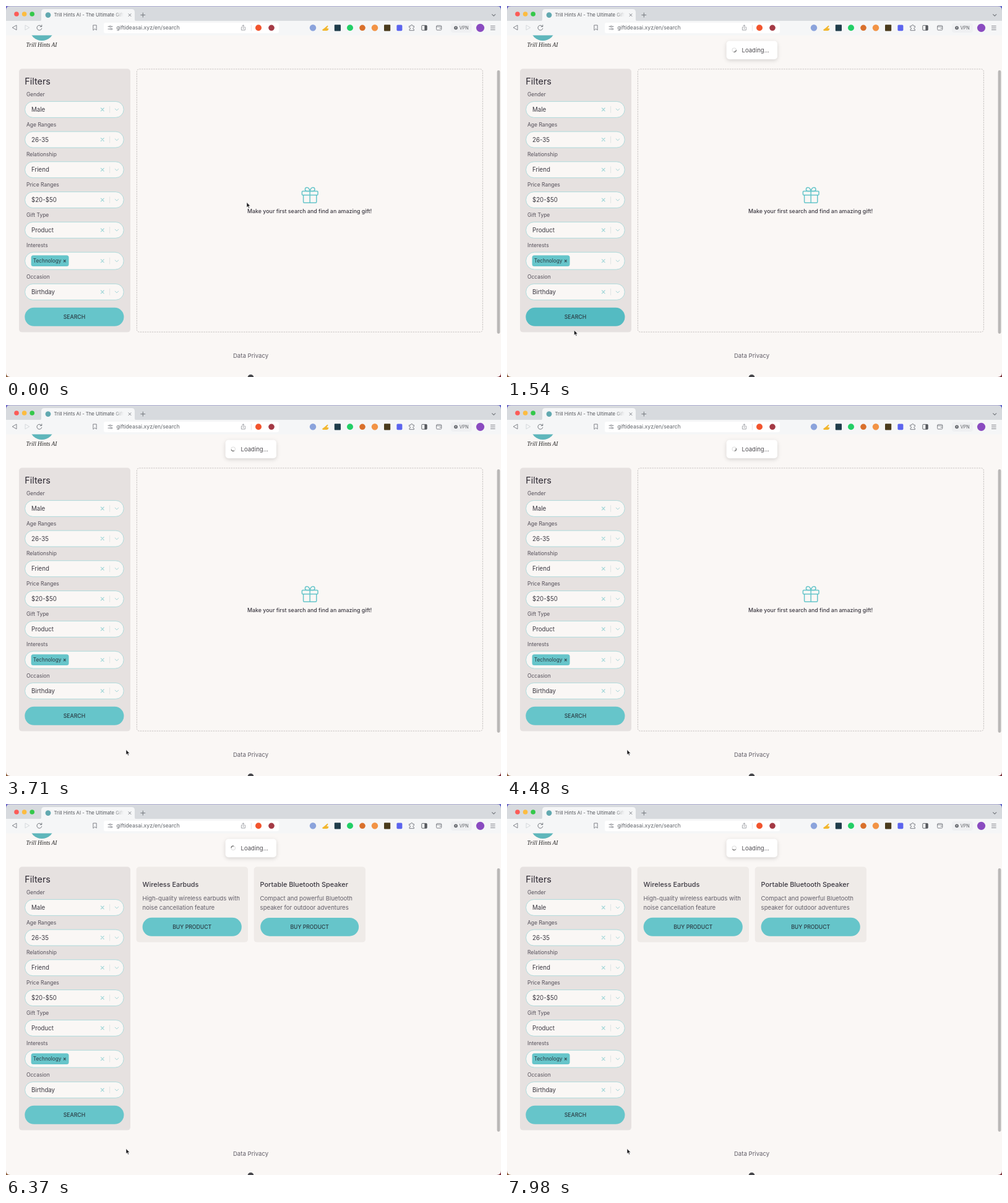
Write an HTML page that moves like this. It is 800x600 px and loops after 8000 ms.

```html
<!DOCTYPE html>
<html lang="en">
<head>
<meta charset="utf-8">
<title>Gift search</title>
<style>
  html, body { margin: 0; width: 100%; height: 100%; overflow: hidden; background: #faf7f5; }
  svg { display: block; width: 800px; height: 600px; font-family: Inter, sans-serif; }
  text { white-space: pre; }
</style>
</head>
<body>
<svg id="stage" viewBox="0 0 800 600" xmlns="http://www.w3.org/2000/svg"></svg>
<script>
const LOOP = 8000;
const TOAST_AT = 1120, CARD_1 = 4550, CARD_2 = 6360;
const TEAL = '#66c5ca', INK = '#3b3841', SOFT = '#625e68', PAGE = '#faf7f5';

const rect = (x, y, w, h, r, fill, more = '') =>
  `<rect x="${x}" y="${y}" width="${w}" height="${h}" rx="${r}" fill="${fill}" ${more}/>`;
const dot = (x, y, r, fill, more = '') =>
  `<circle cx="${x}" cy="${y}" r="${r}" fill="${fill}" ${more}/>`;
const line = (d, color, width = 1, more = '') =>
  `<path d="${d}" fill="none" stroke="${color}" stroke-width="${width}" stroke-linecap="round" stroke-linejoin="round" ${more}/>`;
const text = (x, y, size, str, fill = INK, more = '') =>
  `<text x="${x}" y="${y}" font-size="${size}" fill="${fill}" ${more}>${str}</text>`;
const cross = (x, y, r, color, width) =>
  line(`M${x - r} ${y - r}l${2 * r} ${2 * r}m0 ${-2 * r}l${-2 * r} ${2 * r}`, color, width);
const MID = 'text-anchor="middle"', BOLD = 'font-weight="500"';

function button(x, y, w, label, id) {
  return `<g id="${id}">${rect(x, y, w, 30, 15, TEAL)}` +
    text(x + w / 2, y + 18.2, 8.7, label, '#2a3b43', `${MID} ${BOLD}`) + '</g>';
}

function field(label, value, y, h = 26) {
  const tag = label === 'Interests';
  return text(33, y - h / 2 - 8.5, 8.5, label, '#544f59') +
    rect(30.6, y - h / 2, 159.6, h, h / 2, PAGE, 'stroke="#a8d9da" stroke-width=".9"') +
    (tag
      ? rect(40.6, y - 8.9, 60.9, 17.8, 3.5, TEAL) + text(43.8, y + 3, 8.25, value, '#2a3b43') +
        cross(94.8, y + .2, 1.5, '#2a3b43', 1.1)
      : text(41, y + 3.6, 9.7, value)) +
    cross(155.8, y, 2.4, '#a0d6d8', 1.1) +
    line(`M167.6 ${y - 5}v10`, '#d9dfde', .7) +
    line(`M176.2 ${y - 1.2}l2.8 2.7l2.8-2.7`, '#a9d7d9', 1);
}

function filters() {
  return rect(21, 101.6, 180, 426, 5, '#e6e1e0') +
    text(30.3, 127, 14.4, 'Filters', '#2b2731') +
    field('Gender', 'Male', 167.4) +
    field('Age Ranges', '26-35', 216.1) +
    field('Relationship', 'Friend', 264.8) +
    field('Price Ranges', '$20-$50', 313.6) +
    field('Gift Type', 'Product', 362.4) +
    field('Interests', 'Technology', 412.2, 28) +
    field('Occasion', 'Birthday', 462.4) +
    button(30.3, 487.8, 160.2, 'SEARCH', 'search');
}

function emptyState() {
  return '<g id="empty">' +
    rect(211.4, 102, 559, 425.2, 4, 'none', 'stroke="#c0bcba" stroke-width=".9" stroke-dasharray="2.4 1.4"') +
    `<g fill="none" stroke="${TEAL}" stroke-width="1.5" stroke-linejoin="round">
      <rect x="478.4" y="299.6" width="25.6" height="6.2" rx="1.2"/>
      <path d="M480.6 305.8v11q0 1.5 1.5 1.5h18.2q1.5 0 1.5-1.5v-11M491.2 299.6v18.7"/>
      <path d="M491.2 299.6c-.8-4-2.6-6.2-4.8-6.2c-4 0-4 6.2 0 6.2zm0 0c.8-4 2.6-6.2 4.8-6.2c4 0 4 6.2 0 6.2z"/>
    </g>` +
    text(490.6, 335.2, 8.85, 'Make your first search and find an amazing gift!', INK, `${MID} ${BOLD}`) + '</g>';
}

function card(id, x, title, lines) {
  return `<g id="${id}">` + rect(x, 101.6, 180.4, 122, 5, '#efebe8') +
    text(x + 10, 134.2, 10.9, title, INK, BOLD) +
    lines.map((s, i) => text(x + 10, 155.5 + 15 * i, 9.6, s, SOFT)).join('') +
    button(x + 10, 183.8, 160.2, 'BUY PRODUCT', id + 'Buy') + '</g>';
}

function toast() {
  return '<g id="toast">' +
    rect(354.6, 56.6, 82.4, 29.6, 5, '#fff', 'style="filter:drop-shadow(0 2px 3px rgba(0,0,0,.15))"') +
    dot(367.2, 71.2, 3.2, 'none', 'stroke="#e0e0e0" stroke-width="1.2"') +
    `<g id="spin">${line('M2.26-2.26A3.2 3.2 0 0 1 2.26 2.26', '#707070', 1.2)}</g>` +
    text(379.6, 74.7, 9.5, 'Loading...', '#504e53') + '</g>';
}

function browser() {
  const gray = '#74787e';
  const bar = rect(0, 0, 800, 25, 0, '#d7dade') + rect(0, 24, 800, 23.4, 0, '#f5f6f7') +
    '<path d="M54 24.5q3 0 3-3V10q0-5 5-5h141q5 0 5 5v11.5q0 3 3 3z" fill="#f5f6f7"/>' +
    ['#fc5b57', '#fdbc40', '#34c84a'].map((c, i) => dot(17 + 12.6 * i, 13, 3.8, c)).join('') +
    dot(68, 14.6, 4.4, '#62a9b0') +
    text(77.6, 17.4, 7.7, 'Trill Hints AI - The Ultimate Gift', '#53565b', 'mask="url(#fade)"') +
    cross(200, 14.6, 2, gray, .9) +
    line('M217.8 14.6h7m-3.5-3.5v7', gray, 1) +
    line('M785.6 13.6l2.6 2.6l2.6-2.6', gray, 1.1);
  const nav = line('M17 31.4v7.4l-6.4-3.7z', gray, .9) +
    line('M31 31.4v7.4l6.4-3.7z', '#d2d5d8', .9) +
    line('M57.3 33a4 4 0 1 0 .5 3.4M57.8 30.8v2.6h-2.6', gray, 1) +
    line('M141.2 31h5v8l-2.5-2l-2.5 2z', gray, .9) +
    rect(158, 27, 283, 17, 3, '#fff') +
    line('M165 33.2h2m3 0h2.2M165 37.2h3m3 0h1.2', gray, .9) +
    dot(168.4, 33.2, 1.2, 'none', `stroke="${gray}" stroke-width=".8"`) +
    dot(169.8, 37.2, 1.2, 'none', `stroke="${gray}" stroke-width=".8"`) +
    text(178.4, 38.4, 8.6, 'giftideasai.xyz/en/search', '#5f6369') +
    line('M381.4 34.2h-1v4.8h6v-4.8h-1M383.4 37v-6m-1.6 1.4l1.6-1.6l1.6 1.6', '#8d9196', .8) +
    line('M396.4 31v9', '#dcdee0', .8) +
    dot(408, 35.3, 5, '#f2542d') + dot(429, 35.3, 4.8, '#a43a45');
  const tools = dot(496, 35.3, 5.2, '#8ba3dc') +
    '<path d="M511 38.6l4-3l4.6-4l1 1.2l-2.4 3.2l3.2.4q0 3-3.4 3.6h-6z" fill="#f2b72f"/>' +
    rect(530.8, 30.2, 10.2, 10.2, 1, '#1f3d4b') +
    dot(556, 35.3, 5, '#22cf66') +
    dot(576, 35.3, 4.8, '#d9702c') +
    dot(596, 35.3, 5.2, '#f29345') +
    rect(611, 30.2, 10.2, 10.2, 1, '#4a3b1c') +
    rect(631.4, 30.4, 9, 9.8, 1.6, '#5b64ee') +
    line('M652 32.4h2.2q0-2 1.5-2t1.5 2h2.2v2.4q-1.6 0-1.6 1.5t1.6 1.5v1.8h-7.4v-2q1.6 0 1.6-1.4t-1.6-1.4z', gray, .9) +
    rect(671.8, 31.4, 8.4, 7.8, 1, 'none', 'stroke="#55585d" stroke-width=".9"') +
    rect(676.4, 31.4, 3.8, 7.8, .5, '#55585d') +
    rect(695.6, 31.6, 8.2, 7.4, 1.4, 'none', `stroke="${gray}" stroke-width=".9"`) +
    line('M696 33.6h7.6M701 36.2h2.6', gray, .8) +
    rect(719, 28, 34, 15, 4, '#eff0f2') +
    dot(727, 35.3, 2.9, '#66696e') + dot(727, 35.3, 1, '#cfd1d4') +
    text(732.8, 38, 7.2, 'VPN', '#5c5f64') +
    dot(766.5, 35.3, 6.6, '#8a4bc0') +
    line('M783.4 32.4h6.8m-6.8 3h6.8m-6.8 3h6.8', gray, .9);
  return bar + nav + tools;
}

function corners() {
  return '<path d="M0 0h7q-7 0-7 7z" fill="#5a4fc4"/><path d="M800 0h-7q7 0 7 7z" fill="#4a50c8"/>' +
    '<path d="M0 600h7q-7 0-7-7z" fill="#8a5a38"/><path d="M800 600h-7q7 0 7-7z" fill="#7a2f38"/>' +
    rect(0, 0, 800, .6, 0, '#9694cc');
}

function pointers() {
  return `<path id="arrow" d="M0 0v8.2l1.9-1.7l1.3 3l1.4-.6l-1.3-2.9h2.6z" fill="#1b1b1d" stroke="#fff" stroke-width=".6"/>
    <path id="hand" d="M-1.1 0q1-1 1.9 0v3.2l4 .9q.9.3.7 1.4l-.7 4h-4.6l-3-3.5q-.4-1.3 1.7-.5z" fill="#fff" stroke="#222" stroke-width=".8" stroke-linejoin="round"/>`;
}

document.getElementById('stage').innerHTML =
  `<defs><linearGradient id="edge" gradientUnits="userSpaceOnUse" x1="174" x2="190" y1="0" y2="0">
    <stop stop-color="#fff"/><stop offset="1" stop-color="#000"/></linearGradient>
    <mask id="fade" maskUnits="userSpaceOnUse" x="70" y="4" width="121" height="20">
    <rect x="70" y="4" width="121" height="20" fill="url(#edge)"/></mask></defs>` +
  rect(0, 0, 800, 600, 0, PAGE) +
  dot(58, 36, 20, '#5eb6bb') +
  text(57.5, 65.6, 9.4, 'Trill Hints AI', '#222', `${MID} font-style="italic" style="font-family:'Liberation Serif',serif"`) +
  filters() + emptyState() +
  card('first', 210.6, 'Wireless Earbuds', ['High-quality wireless earbuds with', 'noise cancellation feature']) +
  card('second', 400.6, 'Portable Bluetooth Speaker', ['Compact and powerful Bluetooth', 'speaker for outdoor adventures']) +
  text(395.5, 569, 9.6, 'Data Privacy', SOFT, MID) +
  dot(395.5, 601, 5, '#47474b') +
  rect(793.6, 104, 4.8, 426, 2.4, '#bab8b7') +
  toast() + browser() + corners() + pointers();

const $ = Object.fromEntries([...document.querySelectorAll('[id]')].map(el => [el.id, el]));
const searchFill = $.search.firstChild;
const clamp = v => Math.min(1, Math.max(0, v));
const part = (t, from, to) => clamp((t - from) / (to - from));
const ease = p => p * p * (3 - 2 * p);
const easeOut = p => 1 - (1 - p) ** 3;
const mix = (a, b, p) => a + (b - a) * p;
const show = (el, on) => el.setAttribute('visibility', on ? 'visible' : 'hidden');
const scaleAt = (x, y, s) => `translate(${x} ${y}) scale(${s}) translate(${-x} ${-y})`;

function pointerAt(t) {
  const a = ease(part(t, 60, 660)), b = ease(part(t, 1300, 1900));
  return [mix(mix(389, 61.4, a), 194, b), mix(mix(317.6, 506, a), 557.4, b)];
}

// Button entrance: slightly small, overshoot, settle.
function pop(t, from) {
  const p = part(t, from, from + 250);
  return p < .4 ? mix(.98, 1.02, easeOut(p / .4)) : mix(1.02, 1, easeOut((p - .4) / .6));
}

function draw(t) {
  const [x, y] = pointerAt(t);
  const over = x > 31 && x < 190 && y > 488 && y < 517;
  show($.arrow, !over);
  show($.hand, over);
  (over ? $.hand : $.arrow).setAttribute('transform', `translate(${x} ${y})`);

  const hover = part(t, 490, 690) * (1 - part(t, 1480, 1680));
  searchFill.setAttribute('fill',
    `rgb(${mix(102, 76, hover)},${mix(197, 183, hover)},${mix(202, 191, hover)})`);

  const enter = easeOut(part(t, TOAST_AT, TOAST_AT + 350));
  show($.toast, t >= TOAST_AT);
  $.toast.setAttribute('opacity', mix(.5, 1, enter));
  $.toast.setAttribute('transform',
    `translate(0 ${mix(-59, 0, enter)}) ${scaleAt(395.8, 71.4, mix(.6, 1, enter))}`);
  const turn = t / 1000 + (t < CARD_1 ? .6 : .28);
  $.spin.setAttribute('transform', `translate(367.2 71.2) rotate(${turn * 360 % 360})`);

  show($.empty, t < CARD_1);
  show($.first, t >= CARD_1);
  show($.second, t >= CARD_2);
  $.firstBuy.setAttribute('transform', scaleAt(300.7, 198.8, pop(t, CARD_1)));
  $.secondBuy.setAttribute('transform', scaleAt(490.7, 198.8, pop(t, CARD_2)));
}

const start = performance.now();
function tick() {
  draw((performance.now() - start) % LOOP);
  requestAnimationFrame(tick);
}
tick();
</script>
</body>
</html>
```
